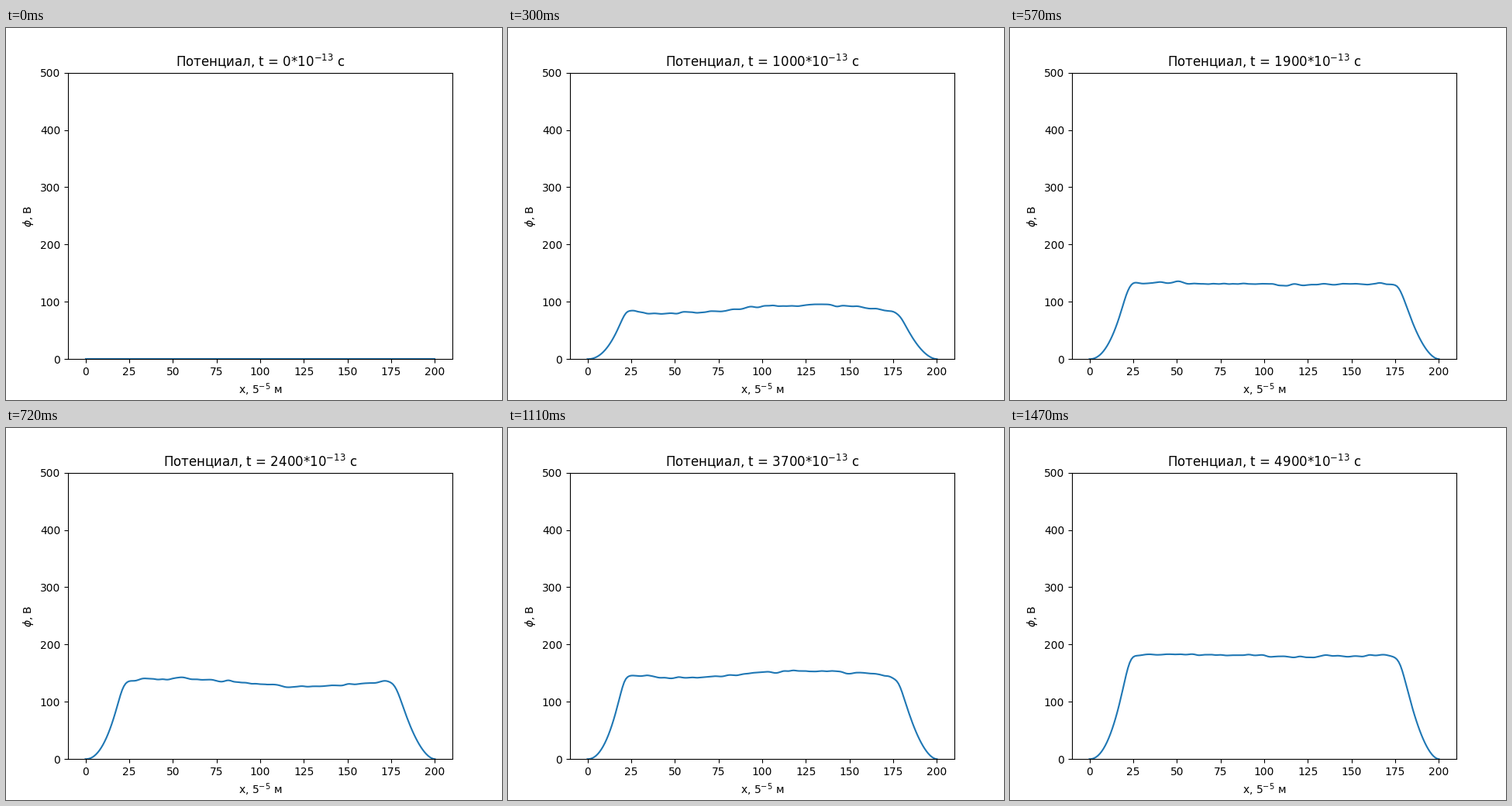
A matplotlib script for the animation above (1.5 s loop, 640 by 480 pixels).

```python
import numpy as np
import matplotlib.pyplot as plt
from matplotlib.animation import FuncAnimation

FRAMES = 50
STEP = 100   # simulated time units per frame
CELLS = 200
SHEATH = 20  # cells between a wall and the plateau


def mean_level(t):
    """Plateau height: fast charging, a pause, then steady growth."""
    return np.interp(t, [0, 1000, 1900, 3000, 3700, 4900],
                     [0, 88, 131, 137, 148, 181])


def smooth(noise, width):
    """Gaussian blur along the last axis that keeps the variance."""
    kernel = np.exp(-np.linspace(-2.5, 2.5, 5 * width) ** 2 / 2)
    kernel /= np.sqrt((kernel ** 2).sum())
    return np.array([np.convolve(row, kernel, "same") for row in noise])


def ripples():
    """Small seeded bumps along x that change gradually with time."""
    noise = np.random.default_rng(4).normal(size=(FRAMES, CELLS + 1))
    return 1.1 * smooth(smooth(noise, 2).T, 1).T


def soft_min(a, b, sharpness=8):
    """Lower of two curves with a rounded corner where they meet."""
    a, b = np.maximum(a, 1e-6), np.maximum(b, 1e-6)
    low, high = np.minimum(a, b), np.maximum(a, b)
    return low * (1 + (low / high) ** sharpness) ** (-1 / sharpness)


def potential(x, t, bumps):
    level = mean_level(t)
    growth = min(t / 1000, 1)
    # Standing wave sloshing between the two halves of the plateau
    wave = np.cos(2 * np.pi * (x - 125) / 150)
    slosh = 7 * wave * np.cos(2 * np.pi * (t - 1000) / 3000)
    plateau = level + growth * (slosh + bumps)
    left = 140 * (1 - np.exp(-t / 1400)) * (x / SHEATH) ** 2.2
    right = 0.81 * level * ((CELLS - x) / SHEATH) ** 1.8
    return soft_min(soft_min(left, plateau), right)


x = np.arange(CELLS + 1.0)
bumps = ripples()

fig, ax = plt.subplots(figsize=(6.4, 4.8), dpi=100)
line, = ax.plot(x, np.zeros_like(x))
ax.set_xlim(-10, 210)
ax.set_ylim(0, 500)
ax.set_xlabel("x, $5^{-5}$ м")
ax.set_ylabel(r"$\phi$, В")


def update(n):
    t = n * STEP
    line.set_ydata(potential(x, t, bumps[n]))
    ax.set_title(f"Потенциал, t = {t}*$10^{{-13}}$ с")
    return line,


anim = FuncAnimation(fig, update, frames=FRAMES, interval=30,
                     repeat=True, repeat_delay=0)
plt.show()
```
